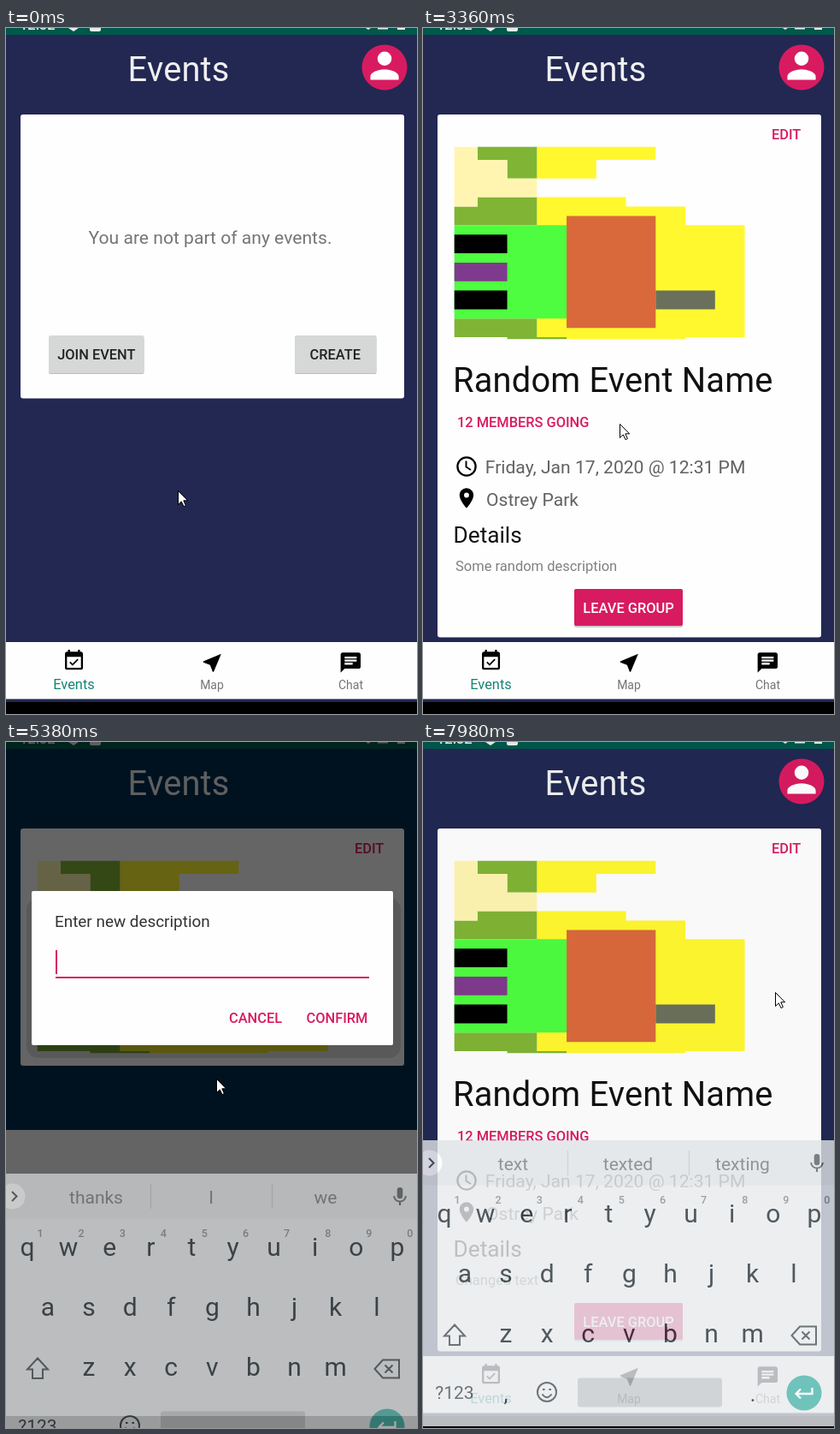
Animation of 481x801 px, one loop 8 s. Source, as an HTML page:

```html
<!DOCTYPE html>
<html lang="en">
<head>
<meta charset="utf-8">
<title>Events app</title>
<style>
html, body { margin: 0; width: 100%; height: 100%; overflow: hidden; background: #000; }
svg { display: block; width: 481px; height: 801px; }
text { font: 21.1px Roboto, sans-serif; white-space: pre; }
.s { font-size: 16.5px; }
.b { font-size: 16.4px; font-weight: 500; }
.h { font-size: 39.8px; letter-spacing: .2px; }
.mid, .keys text { text-anchor: middle; }
.pink { fill: #d81b60; }
.grey { fill: #757575; }
.keys text { font-size: 30px; fill: #263238; }
.keys .num { font-size: 12.5px; font-weight: 500; fill: #858a8d; }
.keys .sug { font-size: 21px; fill: #777c7f; }
.line { fill: none; stroke: #4a5459; stroke-width: 2; }
</style>
</head>
<body>
<svg viewBox="0 0 481 801">
<defs>
  <g id="art">
    <path fill="#fff82e" d="M2-1.4H6V0H4V2H2zM2 4H5V5H7V7H9V19H7V19.2H3V19H2z"/>
    <path fill="#80b435" d="M0-1.4H2V2H1V0H0zM0 4H2V7H-.78V5H0zM-.78 17H2V19H3V19.2H1V19H-.78z"/>
    <path fill="#fff5b0" d="M-.78-1.4H0V0H1V2H2V4H0V5H-.78z"/>
    <path fill="#4efd3f" d="M-.78 7H3V17H-.78z"/>
    <path d="M-.78 8H1V10H-.78zM-.78 14H1V16H-.78z"/>
    <path fill="#7f3a8d" d="M-.78 11H1V13H-.78z"/>
    <path fill="#d9693b" d="M3 6H6V18H3z"/>
    <path fill="#6b705c" d="M6 14H8V16H6z"/>
  </g>
  <filter id="soft" x="-20%" y="-40%" width="140%" height="180%"><feGaussianBlur stdDeviation="2"/></filter>
</defs>

<g id="home">
  <rect id="back" width="481" height="787"/>
  <text class="h" x="142.6" y="62" fill="#efeff1">Events</text>
  <g id="empty">
    <rect x="17" y="101" width="449" height="331.5" rx="3" fill="#fefefe"/>
    <text class="mid grey" x="239" y="252">You are not part of any events.</text>
    <rect id="lift" x="49" y="362" width="113" height="44" rx="3" opacity="0" filter="url(#soft)"/>
    <g fill="#bbb"><rect x="50" y="360" width="111.5" height="44" rx="2"/><rect x="338" y="360" width="95.5" height="44" rx="2"/></g>
    <g fill="#d6d7d7"><rect x="50" y="359" width="111.5" height="44" rx="2"/><rect x="338" y="359" width="95.5" height="44" rx="2"/></g>
    <rect id="press" x="50" y="359" width="111.5" height="44" rx="2" opacity="0"/>
    <g fill="#212121"><text class="b mid" x="105.8" y="387">JOIN EVENT</text><text class="b mid" x="385.3" y="387">CREATE</text></g>
  </g>
  <g id="event">
    <rect id="card" x="17" y="101" width="449" rx="3" fill="#fefefe"/>
    <text class="b pink" x="408" y="130">EDIT</text>
    <use href="#art" transform="translate(63.8 154)scale(34.75 10.9)"/>
    <g id="more">
      <text class="h" x="35" y="425" fill="#111">Random Event Name</text>
      <text class="b pink" x="40" y="466">12 MEMBERS GOING</text>
      <circle cx="51" cy="512" r="10.6" fill="none" stroke="#000" stroke-width="2.3"/>
      <path d="M50.5 505.5V512.5L56 516" fill="none" stroke="#000" stroke-width="1.9"/>
      <text x="72.8" y="520" fill="#616161">Friday, Jan 17, 2020 @ 12:31 PM</text>
      <path transform="translate(36.9 535)scale(1.17)" d="M12 2C8.13 2 5 5.13 5 9c0 5.25 7 13 7 13s7-7.75 7-13c0-3.87-3.13-7-7-7zm0 9.5a2.5 2.5 0 1 1 0-5 2.5 2.5 0 0 1 0 5z"/>
      <text x="74" y="558" fill="#616161">Ostrey Park</text>
      <text x="35.6" y="601" style="font-size:26.2px" fill="#111">Details</text>
      <text class="s" id="desc" x="38" y="634" fill="#808080"></text>
      <rect x="177" y="657" width="127" height="43" rx="2" fill="#ccc"/>
      <rect x="177" y="655" width="127" height="43" rx="2" class="pink"/>
      <text class="b mid" x="240.5" y="683" fill="#fff">LEAVE GROUP</text>
    </g>
  </g>
  <g id="chrome">
    <circle cx="443" cy="46" r="26.5" class="pink"/>
    <path fill="#fff" transform="translate(418.2 19.2)scale(2.07)" d="M12 12a4 4 0 1 0 0-8 4 4 0 0 0 0 8zm0 2c-2.67 0-8 1.34-8 4v2h16v-2c0-2.66-5.33-4-8-4z"/>
    <rect y="717" width="481" height="66.5" fill="#fefefe"/>
    <path transform="translate(65.5 724.8)scale(1.17)" d="M16.53 11.06L15.47 10l-4.88 4.88-2.12-2.12-1.06 1.06L10.59 17l5.94-5.94zM19 3h-1V1h-2v2H8V1H6v2H5c-1.11 0-1.99.9-1.99 2L3 19c0 1.1.89 2 2 2h14c1.1 0 2-.9 2-2V5c0-1.1-.9-2-2-2zm0 16H5V8h14v11z"/>
    <path transform="translate(227.3 727.3)scale(1.17)" d="M21 3L3 10.53v.98l6.84 2.65L12.48 21h.98L21 3z"/>
    <path transform="translate(389.3 727)scale(1.17)" d="M20 2H4c-1.1 0-2 .9-2 2v18l4-4h14c1.1 0 2-.9 2-2V4c0-1.1-.9-2-2-2zM6 9h12v2H6V9zm8 5H6v-2h8v2zm4-6H6V6h12v2z"/>
    <text class="b mid" style="font-weight:400" x="79.5" y="772" fill="#128575">Events</text>
    <g class="mid grey"><text style="font-size:14px" x="241" y="772">Map</text><text style="font-size:14px" x="403.5" y="772">Chat</text></g>
  </g>
  <rect id="blank" y="453" width="481" height="334" fill="#fafafa"/>
</g>

<g id="search">
  <rect width="481" height="787" fill="#222a54"/>
  <text x="2" y="44.5" fill="#171b39" style="letter-spacing:.1px">Search events</text>
  <rect x="3" y="53" width="477" height="1.2" fill="#0d1024"/>
  <g id="result">
    <rect x="17" y="84" width="449" height="367.5" rx="3" fill="#fefefe"/>
    <use href="#art" transform="translate(47 97)scale(38 9.15)"/>
    <text x="35.2" y="315" style="letter-spacing:.2px" fill="#111">Random Event Name</text>
    <text class="s" x="35.5" y="348" fill="#555">Friday, Jan 17, 2020</text>
    <text class="s" x="35.5" y="371" fill="#888">Created by Ned Noddox</text>
    <rect id="hold" x="33" y="402" width="411.5" height="42.5" rx="3" fill="#dfdfdf"/>
    <text class="b mid pink" x="241.5" y="429.5">JOIN EVENT</text>
  </g>
</g>

<rect width="481" height="8" fill="#00574b"/>
<g fill="#e4eeec">
  <text class="b" x="16" y="1.5">12:32</text>
  <path d="M73 0H85L79 4zM98 0H111V2Q111 4 109 4H100Q98 4 98 2zM421 0H427L424 2zM435 0H447V1.5H435zM458 0H467V2H458z"/>
</g>
<rect y="787" width="481" height="14"/>
<rect id="dim" width="481" height="787"/>

<g id="dialog">
  <rect x="24" y="8" width="438" height="187" rx="14" opacity=".12"/>
  <rect x="30" width="423" height="180" rx="2" fill="#fefefe"/>
  <text x="57" y="42" style="font-size:18.9px" fill="#333">Enter new description</text>
  <rect id="rule" x="58" y="100" width="367"/>
  <text id="input" x="57.5" y="92" fill="#222"><tspan id="done"></tspan><tspan id="word" text-decoration="underline"></tspan></text>
  <rect id="caret" y="69" width="2" height="28" class="pink"/>
  <g class="pink"><text class="b" x="261" y="153.5">CANCEL</text><text class="b" x="351.5" y="153.5">CONFIRM</text></g>
</g>

<g id="kb" class="keys">
  <rect y="453" width="481" height="334" fill="#e9ecef"/>
  <rect y="453" width="481" height="52.5" fill="#e1e4e7"/>
  <circle cx="7.5" cy="479.5" r="15" fill="#fff"/>
  <path class="line" d="M7 474L12.5 479.5 7 485"/>
  <path class="line" style="stroke:#c6cacd;stroke-width:1.3" d="M169.5 465V494M311.5 465V494"/>
  <path fill="#5a6367" transform="translate(447.8 466.8)scale(1.1)" d="M12 14a3 3 0 0 0 3-3V5a3 3 0 0 0-6 0v6a3 3 0 0 0 3 3zm5.3-3c0 3-2.54 5.1-5.3 5.1S6.7 14 6.7 11H5c0 3.41 2.72 6.23 6 6.72V21h2v-3.28c3.28-.48 6-3.3 6-6.72h-1.7z"/>
  <path class="line" d="M37 668.5L49 681.5H43V692H31V681.5H25zM441 670.5H460V691.5H441L431.5 681zM443.5 676.5L452.5 685.5M452.5 676.5L443.5 685.5"/>
  <text x="37" y="755" style="font-size:21px;fill:#4a5459">?123</text>
  <text x="97" y="758" style="font-size:25px">,</text>
  <text x="386" y="758" style="font-size:25px">.</text>
  <circle class="line" cx="145" cy="747" r="11"/>
  <path class="line" d="M139.5 749.5Q145 757 150.5 749.5M140 744H142.6M147.4 744H150"/>
  <rect x="181" y="730.5" width="169" height="34" rx="3" fill="#c8cccf"/>
  <circle cx="446" cy="748" r="20.5" fill="#4db6ac"/>
  <path class="line" style="stroke:#fff;stroke-width:2.3" d="M455.5 742V749H437M442 743.5L436.5 749 442 754.5"/>
</g>
<path id="mouse" fill="#fff" stroke="#000" d="M.5.5V16.5L4.3 12.9 7 18.6 9.4 17.5 6.8 11.8H11.6z"/>
</svg>

<script>
const $ = id => document.getElementById(id);
const set = (id, attrs) => { for (const k in attrs) $(id).setAttribute(k, attrs[k]); };
const show = (id, on) => { $(id).style.display = on ? '' : 'none'; };
const move = (id, x, y) => set(id, { transform: `translate(${Math.round(x)} ${Math.round(y)})` });
const part = (t, start, length) => Math.min(1, Math.max(0, (t - start) / length));
const mix = (a, b, p) => a + (b - a) * p;
const out = p => 1 - (1 - p) ** 2;

function addKey(x, y, label, cls) {
  const el = document.createElementNS('http://www.w3.org/2000/svg', 'text');
  el.setAttribute('x', x);
  el.setAttribute('y', y);
  if (cls) el.setAttribute('class', cls);
  el.textContent = label;
  $('kb').append(el);
  return el;
}
[['qwertyuiop', 25], ['asdfghjkl', 49], ['zxcvbnm', 97]].forEach(([row, x], r) =>
  [...row].forEach((c, i) => addKey(x + i * 48.1, 549 + r * 70, c)));
[...'1234567890'].forEach((c, i) => addKey(40 + i * 48.1, 527, c, 'num'));
const hints = [105.5, 240, 374].map(x => addKey(x, 487.5, '', 'sug'));

// time, typed text, three suggestions (* marks the highlighted one)
const typing = [
  [5080, '', 'thanks I we'],
  [5650, 'C', 'C Can Could'],
  [5730, 'Ch', 'Ch Check Chat'],
  [5810, 'Cha', 'Cha Change Chat'],
  [5890, 'Chan', 'Chan Change Chance'],
  [6050, 'Chang', 'Chang Change Changed'],
  [6110, 'Change', 'Change Changed Changes'],
  [6160, 'Changed', 'Changed Changes Change'],
  [6220, 'Changed ', 'the my to'],
  [6370, 'Changed t', 't the to'],
  [6680, 'Changed te', 'te *the to'],
  [6810, 'Changed tex', 'tex *text next'],
  [7020, 'Changed text', 'tex *text next'],
  [7050, 'Changed text', 'text texted texting']
];

// time, x, y of the pointer tip
const trail = [
  [30, 201, 540], [400, 160, 465], [770, 131, 389], [1130, 131, 389], [1430, 200, 403],
  [1900, 230, 385], [2500, 233, 434], [3150, 233, 434], [3570, 227, 490], [3960, 190, 563],
  [4220, 143, 627], [4560, 143, 627], [4890, 246, 393], [7260, 246, 393],
  [7560, 434, 306], [7700, 412, 292]
];

function pointer(t) {
  const n = trail.findIndex(k => k[0] > t);
  if (n < 1) return trail.at(n).slice(1);
  const [a, b] = [trail[n - 1], trail[n]];
  const p = (t - a[0]) / (b[0] - a[0]);
  return [1, 2].map(i => mix(a[i], b[i], p));
}

function drawDialog(t) {
  const shown = part(t, 4470, 150) * (1 - part(t, 7850, 110));
  const [since, typed, words] = typing.findLast(k => k[0] <= t) || typing[0];
  const focus = t >= 5080;
  show('dialog', shown > 0);
  set('dialog', { opacity: shown });
  move('dialog', 0, mix(308, 140, out(part(t, 5290, 165))));
  set('rule', { height: focus ? 2 : 1, fill: focus ? '#d81b60' : '#777' });
  const cut = typed.lastIndexOf(' ') + 1;
  $('done').textContent = typed.slice(0, cut);
  $('word').textContent = typed.slice(cut);
  set('caret', { x: 58 + (typed ? Math.round($('input').getComputedTextLength()) : 0) });
  show('caret', focus && (t - since) % 1000 < 500);
  words.split(' ').forEach((w, i) => {
    hints[i].textContent = w.replace('*', '');
    hints[i].style.cssText = w[0] === '*' ? 'font-weight:700;fill:#000' : '';
  });
}

function draw(t) {
  const joined = t >= 3000, small = t >= 5310 && t < 7880;
  show('empty', !joined);
  show('event', joined);
  show('more', !small);
  show('chrome', !small);
  show('blank', small);
  set('card', { height: small ? 277 : 610.5 });
  $('desc').textContent = t < 7880 ? 'Some random description' : 'Changed text';

  set('lift', { opacity: .28 * part(t, 980, 120) });
  set('press', { opacity: .13 * part(t, 980, 120) * (1 - part(t, 1180, 220)) });

  const enter = out(part(t, 1460, 360)), leave = part(t, 3060, 300);
  const seen = enter * (1 - leave);
  show('search', seen > 0);
  set('search', { opacity: seen });
  move('search', 0, 34 * (1 - enter) + 34 * leave * leave);
  show('result', t >= 1820);
  set('hold', { opacity: part(t, 2740, 80) });

  // the backdrop turns bluer as it darkens
  const dark = part(t, 4470, 220) * (1 - .97 * part(t, 7850, 130));
  set('dim', { opacity: .6 * dark });
  set('back', { fill: `rgb(${mix(34, 0, dark)},${mix(40, 45, dark)},${mix(82, 80, dark)})` });
  drawDialog(t);

  const rise = out(part(t, 5315, 250)), hide = part(t, 7920, 60);
  show('kb', t > 5315);
  set('kb', { opacity: part(t, 5315, 100) - .2 * hide });
  move('kb', 0, 95 * (1 - rise) + 12 * hide * hide);
  move('mouse', ...pointer(t));
}

const begin = performance.now();
function tick(now) {
  draw(Math.max(0, now - begin) % 8000);
  requestAnimationFrame(tick);
}
draw(0);
requestAnimationFrame(tick);
</script>
</body>
</html>
```
